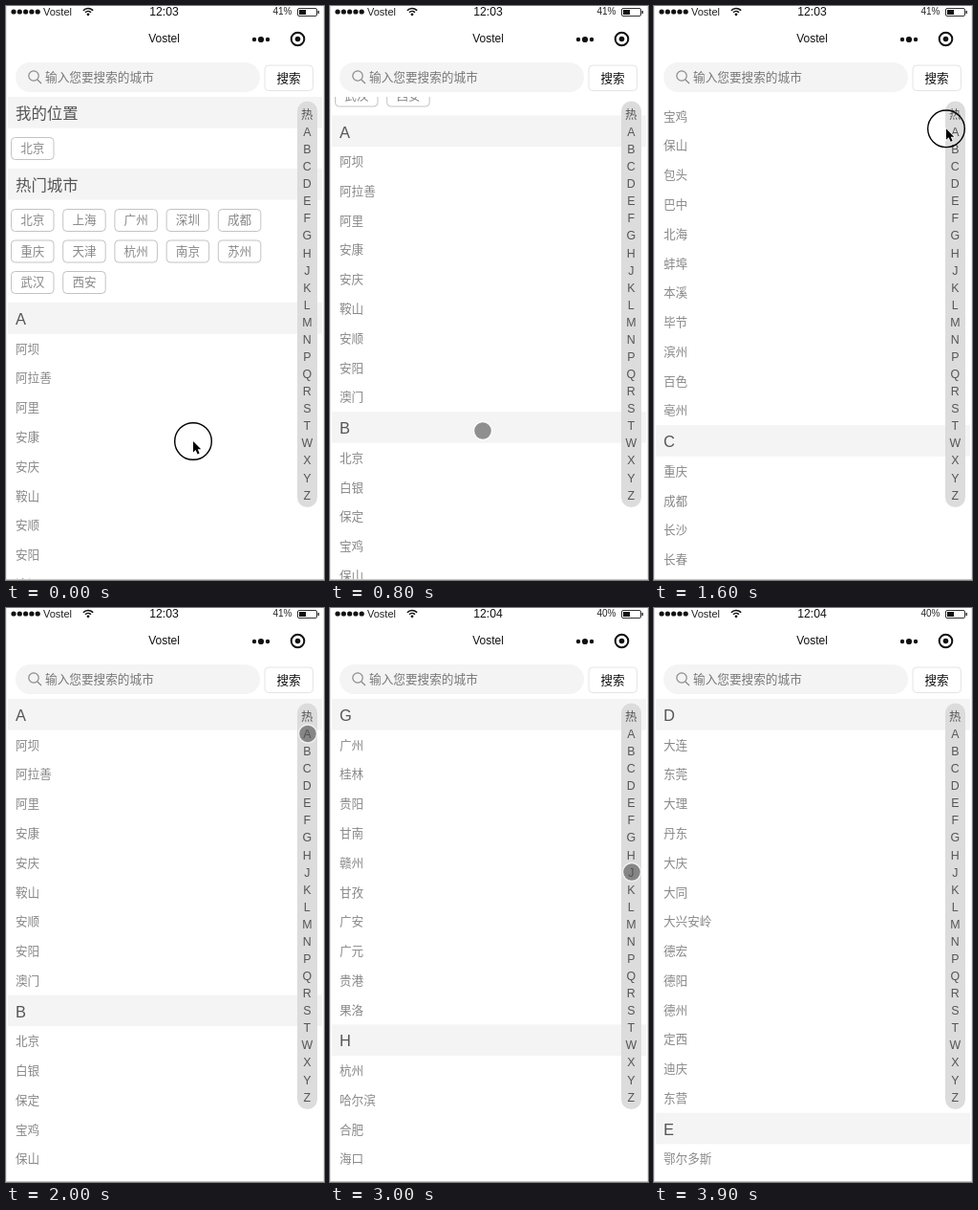
Write an HTML page with a canvas that moves like this. It is 333 by 600 pixels and loops after 4 s.

```html
<!DOCTYPE html>
<html lang="zh-CN">
<head>
<meta charset="utf-8">
<title>城市选择</title>
<style>
  html, body { margin: 0; width: 100%; height: 100%; overflow: hidden; background: #fff; }
  canvas { display: block; width: 333px; height: 600px; }
</style>
</head>
<body>
<canvas id="stage"></canvas>
<script>
const W = 333, H = 600, LOOP = 4000, STEP = 100;
const LIST_TOP = 95, HEADER = 32.6, ROW = 30.78;
const HOT_TOP = 75, CITIES_TOP = 215;
const FONT = '"Liberation Sans", "Noto Sans CJK SC", "Noto Sans CJK", sans-serif';
const APP = 'Vostel';

const canvas = document.getElementById('stage');
const ctx = canvas.getContext('2d');
const ratio = window.devicePixelRatio || 1;
canvas.width = W * ratio;
canvas.height = H * ratio;

const hotCities = '北京 上海 广州 深圳 成都 重庆 天津 杭州 南京 苏州 武汉 西安'.split(' ');
const indexKeys = [...'热ABCDEFGHJKLMNPQRSTWXYZ'];
const cities = {
  A: '阿坝 阿拉善 阿里 安康 安庆 鞍山 安顺 安阳 澳门',
  B: '北京 白银 保定 宝鸡 保山 包头 巴中 北海 蚌埠 本溪 毕节 滨州 百色 亳州',
  C: '重庆 成都 长沙 长春 沧州 常德 昌都 长治 常州 巢湖 潮州 承德 郴州 赤峰 池州 崇左 楚雄 滁州 朝阳',
  D: '大连 东莞 大理 丹东 大庆 大同 大兴安岭 德宏 德阳 德州 定西 迪庆 东营',
  E: '鄂尔多斯 恩施 鄂州',
  F: '福州 防城港 佛山 抚顺 抚州 阜新 阜阳',
  G: '广州 桂林 贵阳 甘南 赣州 甘孜 广安 广元 贵港 果洛',
  H: '杭州 哈尔滨 合肥 海口 呼和浩特 海北 海东 海南 海西 邯郸 汉中 鹤壁 河池 鹤岗 黑河 衡水 衡阳 河源',
  J: '济南 佳木斯 吉安 江门 焦作 嘉兴 嘉峪关 揭阳 吉林 金昌 晋城 景德镇 荆门 荆州 金华 济宁 晋中 锦州'
};

const tops = { 热: HOT_TOP };
let nextTop = CITIES_TOP;
const sections = Object.entries(cities).map(([key, names]) => {
  const rows = names.split(' ');
  const top = tops[key] = nextTop;
  nextTop += HEADER + rows.length * ROW;
  return { key, top, rows };
});

const keyY = key => 113.3 + indexKeys.indexOf(key) * 18.08;
const swipe = (start, end, x, from, to) => ({ start, end, x, from, to });
const tap = (start, key) => ({ ...swipe(start, start + 2 * STEP, 316, keyY(key), keyY(key)), key });

const swipes = [swipe(200, 600, 165, 455, 248), swipe(800, 1300, 160, 444, 84)];
const taps = [tap(1900, 'A'), tap(2300, '热'), tap(2600, 'G'), tap(3000, 'J'), tap(3500, 'D')];
const gestures = [...swipes, ...taps];

const progress = (t, from, to) => Math.min(1, Math.max(0, (t - from) / (to - from)));
const mix = (a, b, p) => a + (b - a) * p;
const easeOut = p => 1 - (1 - p) ** 3;

// Drags scroll the list past a small dead zone, the last one coasts, taps jump to a section.
function scrollAt(t) {
  const chosen = taps.findLast(g => t >= g.start + STEP);
  if (chosen) return tops[chosen.key];
  const dragged = swipes.reduce((sum, g) =>
    sum + Math.max(0, (g.from - g.to) * progress(t, g.start, g.end) - 11.5), 0);
  const coast = Math.max(0, t - swipes[1].end);
  return dragged + 130 * (1 - Math.exp(-coast / 200));
}

// Between gestures the pointer glides and arrives one step early.
function pointerAt(t) {
  const i = gestures.findIndex(g => t < g.end);
  if (i < 0) return null;
  const g = gestures[i];
  if (t >= g.start) {
    return { x: g.x, y: mix(g.from, g.to, progress(t, g.start, g.end)), pressed: true };
  }
  const last = gestures[i - 1] || { end: 0, x: 196, to: 455 };
  const p = easeOut(progress(t, last.end, g.start - STEP));
  return { x: mix(last.x, g.x, p), y: mix(last.to, g.from, p), pressed: false };
}

function text(str, x, y, size, color, align = 'left') {
  ctx.font = `${size}px ${FONT}`;
  ctx.fillStyle = color;
  ctx.textAlign = align;
  ctx.fillText(str, x, y + size * 0.37);
}

function box(x, y, w, h, r, fill, stroke) {
  ctx.beginPath();
  ctx.roundRect(x, y, w, h, r);
  if (fill) { ctx.fillStyle = fill; ctx.fill(); }
  if (stroke) { ctx.strokeStyle = stroke; ctx.lineWidth = 1; ctx.stroke(); }
}

function rect(x, y, w, h, color) {
  ctx.fillStyle = color;
  ctx.fillRect(x, y, w, h);
}

function dot(x, y, r, color) {
  ctx.beginPath();
  ctx.arc(x, y, r, 0, Math.PI * 2);
  ctx.fillStyle = color;
  ctx.fill();
}

function arc(x, y, r, width, color, from = 0, to = Math.PI * 2) {
  ctx.beginPath();
  ctx.arc(x, y, r, from, to);
  ctx.lineWidth = width;
  ctx.strokeStyle = color;
  ctx.stroke();
}

function header(label, y) {
  rect(2, y, 329, HEADER, '#f4f4f4');
  text(label, 10, y + 17, 16.4, '#555');
}

function tag(label, column, y) {
  const x = 5.5 + column * 54.2;
  box(x, y + 0.5, 44.5, 23, 4, '#fff', '#c3c3c3');
  text(label, x + 22.3, y + 11.5, 12.6, '#888', 'center');
}

function drawList(scroll) {
  ctx.save();
  ctx.beginPath();
  ctx.rect(0, LIST_TOP, W, H - LIST_TOP);
  ctx.clip();
  const y0 = LIST_TOP - scroll;
  header('我的位置', y0);
  tag('北京', 0, y0 + 42);
  header('热门城市', y0 + HOT_TOP);
  hotCities.forEach((name, i) => tag(name, i % 5, y0 + 117 + Math.floor(i / 5) * 32.5));
  for (const { key, top, rows } of sections) {
    header(key, y0 + top);
    rows.forEach((name, i) => text(name, 10, y0 + top + HEADER + (i + 0.5) * ROW, 12.6, '#888'));
  }
  ctx.restore();
}

function drawStatus(late) {
  for (let i = 0; i < 5; i++) dot(8 + i * 6.3, 6, 2.6, '#111');
  text(APP, 39, 5.5, 11, '#222');
  for (const r of [4, 7]) arc(86, 9.5, r, 1.6, '#111', -Math.PI * 0.76, -Math.PI * 0.24);
  dot(86, 8.8, 1.4, '#111');
  text(late ? '12:04' : '12:03', 165.5, 5, 12.2, '#111', 'center');
  text(late ? '40%' : '41%', 299.5, 5.5, 10, '#222', 'right');
  box(305.5, 2.5, 20, 8, 1.5, null, '#333');
  rect(307, 4, 7, 5, '#111');
  rect(326.5, 5, 1.5, 3, '#333');
}

function drawTop(late) {
  drawStatus(late);
  text(APP, 165.5, 34, 12, '#111', 'center');
  for (const i of [-1, 0, 1]) dot(267 + i * 7, 35, i ? 2.2 : 3.1, '#111');
  arc(305.5, 34.5, 6.8, 2, '#111');
  dot(305.5, 34.5, 2.8, '#111');

  box(10, 59, 256, 31, 15.5, '#f4f4f4');
  arc(29, 73, 5.2, 1.2, '#888');
  ctx.beginPath();
  ctx.moveTo(32.8, 77);
  ctx.lineTo(37, 81);
  ctx.stroke();
  text('输入您要搜索的城市', 41, 74.5, 12.65, '#777');
  box(271, 62, 50.5, 26.5, 4, '#fff', '#e4e4e4');
  text('搜索', 296, 75, 12.6, '#111', 'center');
}

function drawIndex() {
  box(305, 99.5, 21, 424.5, 10.5, '#dcdcdc');
  for (const key of indexKeys) text(key, 315.3, keyY(key), 12.4, '#555', 'center');
}

const arrow = new Path2D('M0 0V11.5L2.6 9L4.6 13.5L6.6 12.6L4.7 8.3H8.2Z');

function drawPointer({ x, y, pressed }) {
  if (pressed) {
    dot(x, y, 9, 'rgba(80,80,80,.62)');
    arc(x, y, 9.5, 1.5, 'rgba(255,255,255,.6)');
    return;
  }
  arc(x, y, 19.3, 1.4, '#000');
  ctx.save();
  ctx.translate(x, y);
  ctx.strokeStyle = '#fff';
  ctx.stroke(arrow);
  ctx.fillStyle = '#000';
  ctx.fill(arrow);
  ctx.restore();
}

function draw(t) {
  ctx.setTransform(ratio, 0, 0, ratio, 0, 0);
  rect(0, 0, W, H, '#fff');
  drawList(scrollAt(t));
  drawTop(t >= 3000);
  drawIndex();
  rect(0, 0, 1, H, '#e6e6e6');
  rect(W - 1, 0, 1, H, '#e6e6e6');
  rect(0, H - 1, W, 1, '#c4c4c4');
  const pointer = pointerAt(t);
  if (pointer) drawPointer(pointer);
}

const start = performance.now();
function tick() {
  const elapsed = (performance.now() - start) % LOOP;
  draw(Math.floor(elapsed / STEP) * STEP);
  requestAnimationFrame(tick);
}
tick();
</script>
</body>
</html>
```
